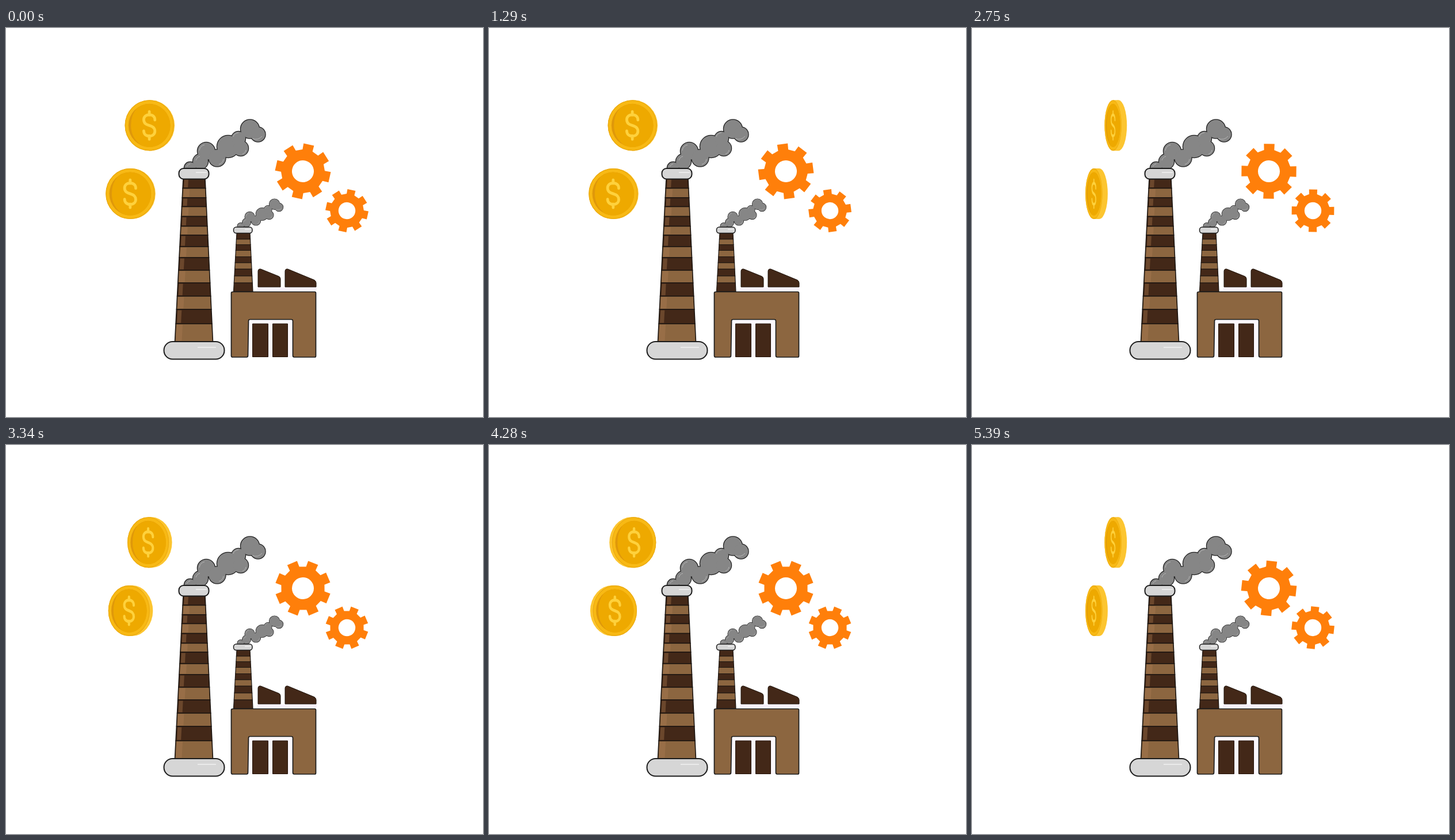
Animation, 829 px wide and 676 px high, one loop 5.42 s. Source, as an HTML page:

```html
<!DOCTYPE html>
<html lang="en">
<head>
<meta charset="utf-8">
<title>Factory, coins and gears</title>
<style>
html, body { margin: 0; width: 100%; height: 100%; overflow: hidden; background: #fff; }
svg { display: block; width: 829px; height: 676px; }
</style>
</head>
<body>
<svg viewBox="0 0 829 676">
  <defs>
    <g id="puffs">
      <circle cx="320" cy="243" r="10"/><circle cx="338" cy="232" r="13"/>
      <circle cx="348" cy="214" r="15"/><circle cx="367" cy="226" r="14.5"/>
      <circle cx="386" cy="206" r="19"/><circle cx="408" cy="209" r="13"/>
      <circle cx="404" cy="192" r="12"/><circle cx="424" cy="175.500" r="16"/>
      <circle cx="438" cy="185" r="12.500"/>
    </g>
    <g id="smoke">
      <use href="#puffs" fill="#222" stroke="#222" stroke-width="2.500"/>
      <use href="#puffs" fill="#868686"/>
      <path d="M336 213a12 12 0 0 1 9-10M378 228a11 11 0 0 1-8 9M395 189a9 9 0 0 1 9-7M417 212a9 9 0 0 1-6 7M428 192q10 4 17-4M330 230q2-6 7-7M314 241q2-4 6-5"
        fill="none" stroke="#b5b5b5"/>
    </g>
    <g id="face">
      <circle r="44" fill="#f8b914"/>
      <circle r="43.300" fill="none" stroke="#e9a812" stroke-width="1.200"/>
      <circle r="37.500" fill="#df980a"/>
      <path d="M-22 -30A37.500 37.500 0 1 1 -14 35Q-33 22 -33 0Q-33 -19 -22 -30Z" fill="#eea900"/>
      <path d="M10 -9.500C10 -15 6 -18.500 0 -18.500C-6 -18.500 -10 -15 -10 -10C-10 -3 -5 -1.500 0 0C5 1.500 10 3.500 10 10C10 15 6 18.500 0 18.500C-6 18.500 -10 15 -10 9.500M0 -24V-18M0 18V24"
        fill="none" stroke="#fed13c" stroke-width="5" stroke-linecap="round"/>
    </g>
  </defs>

  <use href="#smoke"/>
  <use href="#smoke" transform="translate(227 207) scale(.565)"/>
  <g id="stacks"></g>

  <g fill="#d6d6d6" stroke="#1c1c1c" stroke-width="2">
    <rect x="300.500" y="244" width="52" height="18.500" rx="8"/>
    <rect x="274.500" y="545" width="105" height="30.500" rx="15"/>
    <rect x="395.500" y="346" width="32.500" height="10.500" rx="4.500" stroke-width="1.500"/>
  </g>
  <path d="M330 251H349M333 555H365M415 350H425" stroke="#fff" stroke-width="1.200"/>

  <path d="M436 453.500H540" stroke="#f7f1fa" stroke-width="5"/>
  <g fill="#432818" stroke="#1c1008">
    <path d="M438 450V423Q438 418 443 419L474 431.500Q477 433 477 436V450Z"/>
    <path d="M485 450V423Q485 418 490 419L536 438Q539 440 539 443V450Z"/>
  </g>
  <path d="M421 572V508H498V572Z" fill="#fbf7fc"/>
  <path d="M394 458.500H536.500Q538.500 458.500 538.500 460.500V570Q538.500 572 536.500 572H501Q498.500 572 498.500 569V509Q498.500 506.500 496 506.500H424Q421.500 506.500 421.500 509L420.500 569Q420.500 572 418 572H394Q391.500 572 391.500 569.500V460.500Q391.500 458.500 394 458.500Z"
    fill="#8c6640" stroke="#1c1c1c" stroke-width="1.700"/>
  <path d="M428.500 514H455.500V571.500H428.500ZM463.500 514H489.500V571.500H463.500Z" fill="#432818" stroke="#26150b"/>

  <g id="moving"></g>
</svg>
<script>
const LOOP = 5420;
const moving = document.getElementById('moving');

function add(parent, tag, attrs) {
  const el = document.createElementNS('http://www.w3.org/2000/svg', tag);
  for (const key in attrs) el.setAttribute(key, attrs[key]);
  return parent.appendChild(el);
}

// Tapered chimney of alternating bands; left and right are [top, bottom] edges.
function stack(edges, left, right, shine, line) {
  const root = document.getElementById('stacks');
  const top = edges[0], bottom = edges[edges.length - 1];
  const at = (side, y) => side[0] + (side[1] - side[0]) * (y - top) / (bottom - top);
  const quad = (y1, y2, a, b) => `M${a(y1)} ${y1}H${b(y1)}L${b(y2)} ${y2}H${a(y2)}Z`;
  const l = y => at(left, y), r = y => at(right, y);
  for (let i = 0; i + 1 < edges.length; i++) {
    const y1 = edges[i], y2 = edges[i + 1], dark = i % 2 == 0;
    add(root, 'path', { d: quad(y1, y2, l, r), fill: dark ? '#432818' : '#8c6640' });
    if (shine) add(root, 'path', {
      d: quad(y1 + 1.5, y2 - 1.5, y => l(y) + 2, y => l(y) + (dark ? 9 : 12)),
      fill: dark ? '#6b472c' : '#986e47'
    });
    add(root, 'path', { d: quad(y1, y2, l, r), fill: 'none', stroke: '#1c1510', 'stroke-width': line });
  }
}
stack([262, 278.5, 295, 310.5, 327.5, 344.5, 360, 380, 399, 421, 443, 466, 489, 514, 545],
  [308, 293.5], [346, 359.5], true, 1.6);
stack([356, 367, 376.5, 386.5, 397.5, 408, 419, 431, 443, 458], [401, 395.5], [424, 429], false, 1.2);

function gear(x, y, radius) {
  const polar = (deg, r) => {
    const a = deg * Math.PI / 180;
    return (r * Math.sin(a)).toFixed(2) + ' ' + (-r * Math.cos(a)).toFixed(2);
  };
  const points = [];
  for (let a = 0; a < 360; a += 45)
    points.push(polar(a - 13.5, 38), polar(a - 11, 48.5), polar(a + 11, 48.5), polar(a + 13.5, 38));
  const d = `M${points.join('L')}ZM19 0A19 19 0 1 0 -19 0A19 19 0 1 0 19 0Z`;
  const el = add(moving, 'path', { d, fill: '#ff7f0a', 'fill-rule': 'evenodd' });
  return deg => el.setAttribute('transform', `translate(${x} ${y}) scale(${radius / 48.5}) rotate(${deg})`);
}

function coin(x, y) {
  const root = add(moving, 'g', { transform: `translate(${x} ${y})` });
  const side = { fill: '#fcc530' };
  const back = add(root, 'ellipse', { ...side, ry: 44 });
  const edge = add(root, 'rect', { ...side, y: -44, height: 88 });
  const face = add(root, 'use', { href: '#face' });
  return deg => {
    const a = (((deg + 90) % 180 + 180) % 180 - 90) * Math.PI / 180;
    const squash = Math.max(Math.cos(a), .01), shift = 5 * Math.sin(a);
    back.setAttribute('cx', shift);
    back.setAttribute('rx', 43 * squash);
    edge.setAttribute('x', -Math.abs(shift));
    edge.setAttribute('width', 2 * Math.abs(shift));
    face.setAttribute('transform', `translate(${-shift} 0) scale(${squash * 43 / 44} 1)`);
  };
}

const gears = [gear(516, 249, 48.5), gear(592.5, 317.5, 37.5)];
const coins = [coin(249.8, 169.3), coin(216.5, 288)];

// Uneven coin spin: [step, degrees] over one full turn of 18 steps.
const spin = [[0, 8], [2, 70], [5, 153], [10, 213], [11, 230], [18, 368]];
function coinAngle(step) {
  const s = step % 18;
  const i = spin.findIndex(k => k[0] > s);
  const [s0, a0] = spin[i - 1], [s1, a1] = spin[i];
  return a0 + (a1 - a0) * (s - s0) / (s1 - s0);
}

// Ten steps every 730 ms, the tenth one held longer.
const stepAt = t => 10 * Math.floor(t / 730) + Math.min(9, Math.floor(t % 730 / 70));

const start = performance.now();
function draw() {
  const step = stepAt((performance.now() - start) % LOOP);
  gears.forEach(turn => turn(12.5 + 13.9 * step));
  coins.forEach(turn => turn(coinAngle(step)));
  requestAnimationFrame(draw);
}
draw();
</script>
</body>
</html>
```
